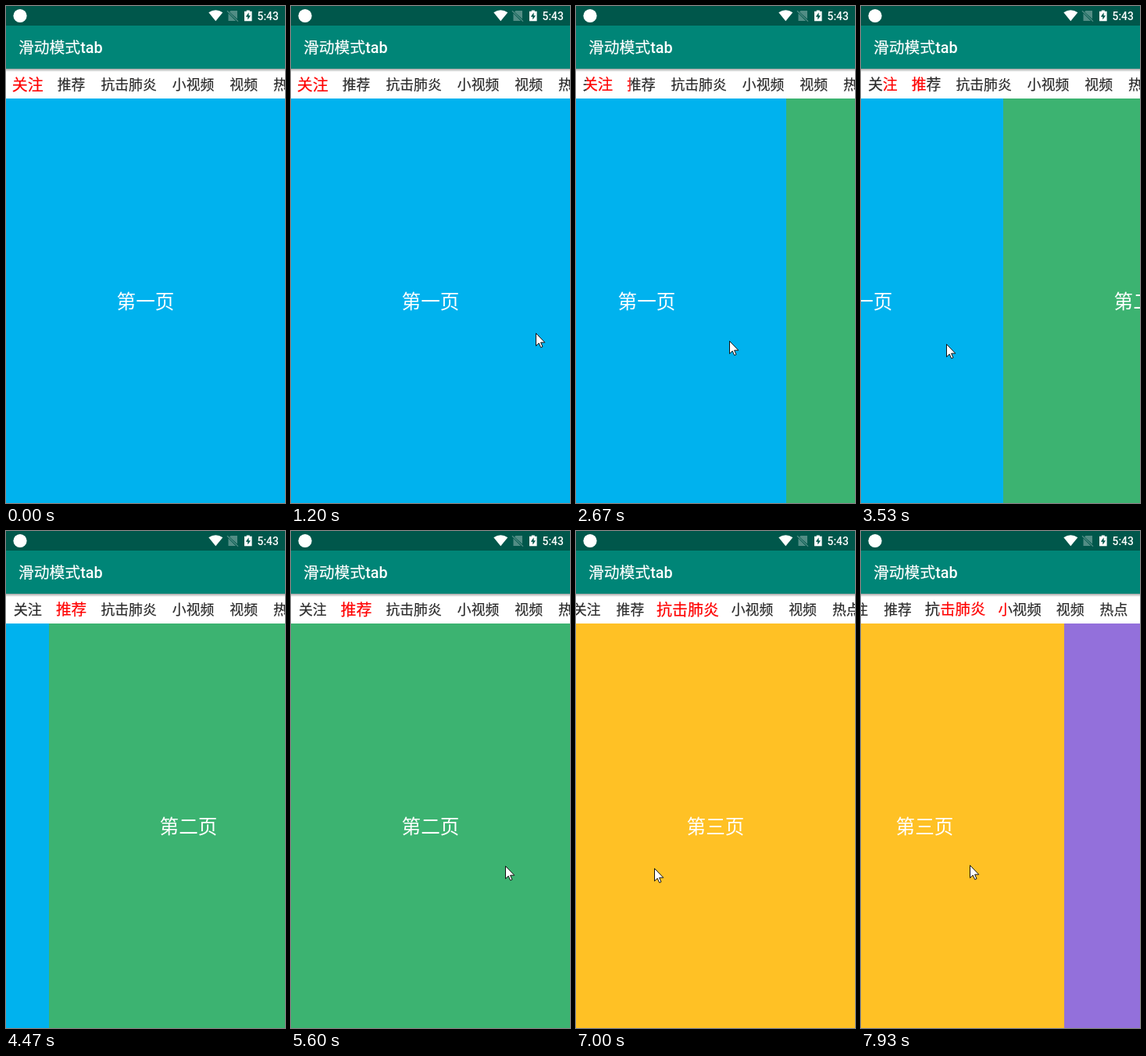
These frames come from a looping animation (357x634 px, 8 s). An HTML page:

```html
<!DOCTYPE html>
<html lang="zh-CN">
<head>
<meta charset="utf-8">
<title>滑动模式tab</title>
<style>
  html, body { margin: 0; width: 100%; height: 100%; overflow: hidden; background: #fff; }
  svg { display: block; width: 357px; height: 634px; font-family: Roboto, "Noto Sans CJK SC", "Noto Sans CJK", sans-serif; }
  .tab { font-size: 17.85px; text-anchor: middle; stroke-width: .2; }
  .page { font-size: 24.6px; text-anchor: middle; fill: #fff; }
</style>
</head>
<body>
<svg viewBox="0 0 357 634">
  <defs>
    <linearGradient id="shade" x1="0" y1="0" x2="0" y2="1">
      <stop offset="0" stop-color="#000" stop-opacity=".36"/>
      <stop offset="1" stop-color="#000" stop-opacity="0"/>
    </linearGradient>
  </defs>

  <g id="pages"></g>

  <rect y="80" width="357" height="38" fill="#fff"/>
  <g id="tabs"></g>
  <rect y="80" width="357" height="4" fill="url(#shade)"/>

  <rect width="357" height="80" fill="#008577"/>
  <rect width="357" height="25" fill="#00574b"/>
  <text x="16" y="59.7" font-size="19.8" fill="#fff" stroke="#fff" stroke-width=".2">滑动模式<tspan font-weight="500" stroke="none">tab</tspan></text>

  <g fill="#fff">
    <circle cx="18" cy="12.5" r="8.6"/>
    <path d="M268.3 19.2 259.3 8.2Q268.3 2.2 277.3 8.2Z"/>
    <g opacity=".32">
      <path d="M287.5 6H296V16.5L286 7.6Z"/>
      <path d="M284.5 9.5 294 19H284.5Z"/>
      <path d="M283 6.2 297 19.6" fill="none" stroke="#fff" stroke-width="1.3"/>
    </g>
    <path d="M307.8 5.4H311.8V6.8H314.6V19.3H305V6.8H307.8Z"/>
    <path d="M310.6 8.2 306.8 13.7H309.3V17.6L313 12.2H310.6Z" fill="#00574b"/>
    <text x="321.6" y="17.7" font-size="13.8" font-weight="500">5:43</text>
  </g>

  <path id="cursor" d="M.5 .5V16.6L4.2 13.1 6.7 18.6 9 17.6 6.6 12.2H11.8Z" fill="#fff" stroke="#111"/>
</svg>
<script>
const W = 357, FPS = 15, TICKS = 8 * FPS, SETTLE = 5;
const PAD = 10, GLYPH = 17.85, GROW = .12, SCROLL_AT = 143;
const NS = 'http://www.w3.org/2000/svg';
const $ = id => document.getElementById(id);
const lerp = (a, b, u) => a + (b - a) * u;
const clamp = (v, lo, hi) => Math.min(hi, Math.max(lo, v));
const easeOut = u => 1 - (1 - u) ** 5;

function add(parent, tag, attrs, text) {
  const el = document.createElementNS(NS, tag);
  for (const k in attrs) el.setAttribute(k, attrs[k]);
  if (text) el.textContent = text;
  return parent.appendChild(el);
}

// Turning points of the pointer: tick, x, y
const POINTER = [
  [0, 180, 640], [4, 180, 640], [5, 190, 615], [16, 284, 401], [17, 288, 415], [18, 313, 417],
  [21, 313, 417], [40, 196, 427], [53, 109, 431], [67, -18, 434],
  [75, -18, 436], [76, 21, 436], [81, 293, 426],
  [83, 293, 426], [94, 81, 432], [98, 18, 433],
  [103, 18, 433], [109, 265, 424],
  [110, 265, 424], [120, 125, 426]
];

// Each drag pulls the page once the pointer is left of `grip`, then settles after release.
const DRAGS = [
  { press: 21, release: 67, grip: 284 },
  { press: 83, release: 98, grip: 264 },
  { press: 110, release: 120, grip: 236 }
];

function pointerAt(tick) {
  const n = clamp(POINTER.findIndex(k => k[0] > tick), 1, POINTER.length - 1);
  const [t0, x0, y0] = POINTER[n - 1], [t1, x1, y1] = POINTER[n];
  const u = (tick - t0) / (t1 - t0);
  return [Math.round(lerp(x0, x1, u)), Math.round(lerp(y0, y1, u))];
}

function dragShift({ press, release, grip }, tick) {
  if (tick < press) return 0;
  const pulled = Math.max(0, grip - pointerAt(Math.min(tick, release))[0]);
  return lerp(pulled, W, easeOut(clamp((tick - release) / SETTLE, 0, 1)));
}

const pages = [['第一页', '#00b2ee'], ['第二页', '#3cb371'], ['第三页', '#ffc125'], ['第四页', '#9370db']];
pages.forEach(([label, fill], i) => {
  add($('pages'), 'rect', { x: i * W, y: 118, width: W, height: 516, fill });
  add($('pages'), 'text', { x: (i + .5) * W, y: 385.8, class: 'page' }, label);
});

let edge = 0;
const tabs = ['关注', '推荐', '抗击肺炎', '小视频', '视频', '热点'].map((label, i) => {
  const width = label.length * GLYPH + 2 * PAD, left = edge, mid = left + width / 2;
  edge += width;
  const layers = ['#2a2a2a', '#f00'].map((color, j) => {
    const id = `clip${i}-${j}`;
    const clip = add(add($('tabs'), 'clipPath', { id }), 'rect', { y: 80, height: 38 });
    const box = add($('tabs'), 'g', { 'clip-path': `url(#${id})` });
    return { clip, text: add(box, 'text', { class: 'tab', y: 6.7, fill: color, stroke: color }, label) };
  });
  return { left, width, mid, layers };
});

function setClip(rect, x, width) {
  rect.setAttribute('x', x);
  rect.setAttribute('width', width);
}

// Red leaves a tab from its left edge and enters the next one from its left edge.
function drawTab({ left, width, mid, layers: [dark, red] }, distance) {
  const near = Math.max(0, 1 - Math.abs(distance));
  const redW = near * width, darkW = width - redW, entering = distance < 0;
  for (const { text } of [dark, red])
    text.setAttribute('transform', `translate(${mid} 100) scale(${1 + GROW * near})`);
  setClip(red.clip, entering ? left : left + darkW, redW);
  setClip(dark.clip, entering ? left + redW : left, darkW);
}

function draw(time) {
  const tick = Math.floor((time + 5) * FPS / 1000) % TICKS;
  const shift = Math.round(DRAGS.reduce((sum, d) => sum + dragShift(d, tick), 0));
  const p = shift / W, i = Math.floor(p);
  $('pages').setAttribute('transform', `translate(${-shift} 0)`);

  const center = lerp(tabs[i].mid, tabs[i + 1].mid, p - i);
  $('tabs').setAttribute('transform', `translate(${-Math.max(0, center - SCROLL_AT)} 0)`);
  tabs.forEach((tab, n) => drawTab(tab, p - n));

  $('cursor').setAttribute('transform', `translate(${pointerAt(tick)})`);
}

const start = performance.now();
(function loop() {
  draw(performance.now() - start);
  requestAnimationFrame(loop);
})();
</script>
</body>
</html>
```
